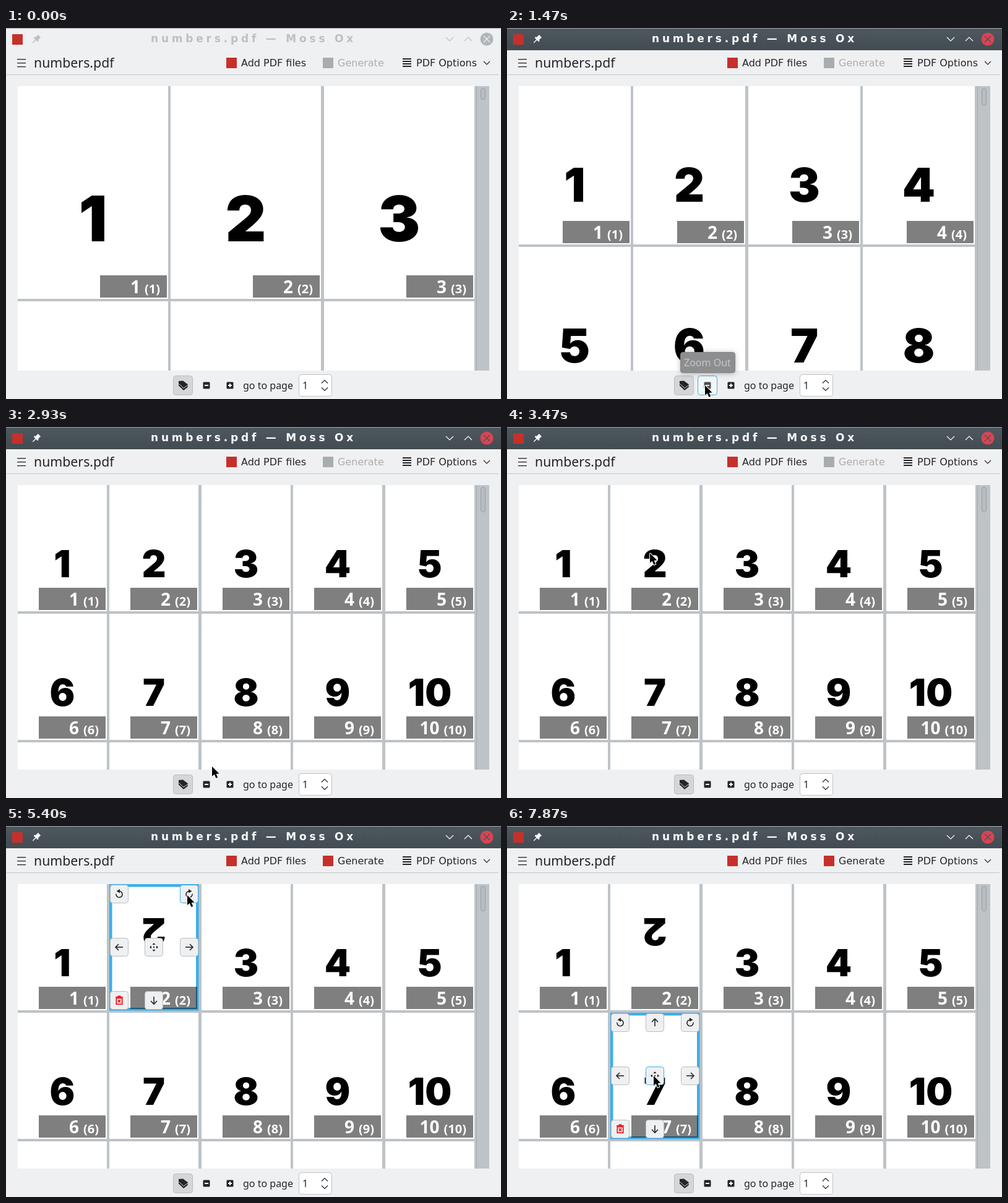
Animation of 800x600 px, one loop 8000 ms. Source, as an HTML page with a canvas:

```html
<!DOCTYPE html>
<html lang="en">
<head>
<meta charset="utf-8">
<title>Page editor</title>
<style>
html, body { margin: 0; width: 100%; height: 100%; overflow: hidden; background: #eff0f1; }
canvas { display: block; width: 800px; height: 600px; }
</style>
</head>
<body>
<canvas id="stage" width="800" height="600"></canvas>
<script>
const LOOP = 8000, STEP = 1000 / 15;
const BG = '#eff0f1', GREY = '#bdc3c7', INK = '#232629', BLUE = '#3daee9', PRESSED = '#a9d5ef', RED = '#c6302b';
const SANS = '"Noto Sans", sans-serif', UI = '"DejaVu Sans", sans-serif', HEAVY = 'Inter, sans-serif';
const c = document.getElementById('stage').getContext('2d');

// pointer track: time, x, y
const TRACK = [
  [133, 320, 602], [333, 320, 590], [533, 320, 590], [733, 320, 578],
  [2867, 320, 578], [3067, 360, 490], [3267, 262, 320], [3400, 211, 222], [3466, 231, 204],
  [3867, 231, 204], [4400, 293, 112], [5933, 293, 112], [6200, 372, 235],
  [6533, 346, 344], [6733, 235, 344], [7533, 235, 344], [7866, 237, 404]
];
let now = 0, mouse = [0, 0];

const clamp = k => Math.max(0, Math.min(1, k));
const between = (a, b) => now >= a - 1 && now < b - 1;
const mix = (a, b, k) => `rgb(${a.map((v, i) => Math.round(v + (b[i] - v) * k))})`;

function pointerAt(t) {
  const i = TRACK.findIndex(p => p[0] > t);
  if (i === 0) return [320, 640];
  if (i < 0) return TRACK.at(-1).slice(1);
  const [t0, x0, y0] = TRACK[i - 1], [t1, x1, y1] = TRACK[i];
  const k = (t - t0) / (t1 - t0);
  return [Math.round(x0 + (x1 - x0) * k), Math.round(y0 + (y1 - y0) * k)];
}

function rect(x, y, w, h, color) {
  c.fillStyle = color;
  c.fillRect(x, y, w, h);
}
function box(x, y, w, h, r, fill, stroke) {
  c.beginPath();
  c.roundRect(x + .5, y + .5, w - 1, h - 1, r);
  c.fillStyle = fill;
  c.fill();
  if (stroke) { c.strokeStyle = stroke; c.lineWidth = 1; c.stroke(); }
}
function text(s, x, y, font, color, align = 'left') {
  c.font = font;
  c.fillStyle = color;
  c.textAlign = align;
  c.fillText(s, x, y);
  return c.measureText(s).width;
}
function line(color, width, ...pts) {
  c.beginPath();
  for (let i = 0; i < pts.length; i += 2) c.lineTo(pts[i], pts[i + 1]);
  c.strokeStyle = color;
  c.lineWidth = width;
  c.stroke();
}
function shape(color, ...pts) {
  c.beginPath();
  for (let i = 0; i < pts.length; i += 2) c.lineTo(pts[i], pts[i + 1]);
  c.fillStyle = color;
  c.fill();
}
// chevron: dir 1 points down, -1 points up
const chevron = (x, y, w, dir, color, width = 1.2) =>
  line(color, width, x - w, y - dir * w / 2, x, y + dir * w / 2, x + w, y - dir * w / 2);

function at(x, y, angle, draw, flip = 1) {
  c.save();
  c.translate(x, y);
  c.rotate(angle);
  c.scale(flip, 1);
  draw();
  c.restore();
}
const isOver = (x, y, w, h) => mouse[0] >= x && mouse[0] < x + w && mouse[1] >= y && mouse[1] < y + h;

// ---- page grid ----
function cellOf(i, cols) {
  const pitch = 742.5 / cols, h = (pitch - 4) * 1.414;
  return {
    x: Math.floor(19 + i % cols * pitch), y: Math.floor(94 + Math.floor(i / cols) * (h + 4)),
    w: Math.floor(pitch - 4), h: Math.floor(h)
  };
}

function page(i, cols, selected) {
  const { x, y, w, h } = cellOf(i, cols);
  if (y > 554) return;
  const turns = i === 1 ? between(4667, 5333) ? 1 : now >= 5332 ? 2 : 0 : 0;
  at(x + w / 2, y + h / 2, turns * Math.PI / 2, () => {
    if (turns === 1) c.scale(w / h, w / h);
    rect(-w / 2, -h / 2, w, h, '#fff');
    text(i + 1, 0, h * .23, `900 ${w * .42}px ${HEAVY}`, '#000', 'center');
  });
  if (selected) {
    c.strokeStyle = BLUE;
    c.lineWidth = 4.5;
    c.strokeRect(x + 2.25, y + 2.25, w - 4, h - 4);
  }
  const right = x + w - 2, base = y + h - 9;
  rect(right - 108, y + h - 38, 108, 36, 'rgba(0,0,0,.5)');
  const small = text(`(${i + 1})`, right - 11, base, `bold 20px ${SANS}`, '#fff', 'right');
  text(i + 1, right - 18 - small, base, `bold 28px ${SANS}`, '#fff', 'right');
  if (selected) pageButtons(x, y, i >= cols);
}

function grid(cols, selected = -1) {
  for (let i = 0; i < cols * 3; i++) page(i, cols, i === selected);
}

const arrow = () => {
  line(INK, 1.6, -6, 0, 6, 0);
  line(INK, 1.6, 1, -5, 6, 0, 1, 5);
};
const turnArrow = () => {
  c.beginPath();
  c.arc(0, .5, 5, -Math.PI * .45, Math.PI * 1.05);
  c.strokeStyle = INK;
  c.lineWidth = 1.6;
  c.stroke();
  shape(INK, -4.5, -4.5, 1, -8, 1, -1.5);
};
const moveIcon = () => {
  rect(-1, -1, 2, 2, INK);
  for (let k = 0; k < 4; k++) at(0, 0, k * Math.PI / 2, () => shape(INK, 4, -2.5, 7, 0, 4, 2.5));
};
const bin = () => {
  const red = '#e60a14';
  rect(-6, -6, 12, 1.6, red);
  rect(-2.5, -7.5, 5, 2, red);
  c.strokeStyle = red;
  c.lineWidth = 1.6;
  c.strokeRect(-4.7, -3.5, 9.4, 9.7);
  line(red, 1.6, -2, -1, 2, 3.5);
  line(red, 1.6, 2, -1, -2, 3.5);
};

function pageButtons(x, y, hasUp) {
  const put = (col, row, draw, angle = 0, flip = 1) => {
    const bx = x + [1, 57, 114][col], by = y + [1, 87, 173][row];
    const over = isOver(bx, by, 30, 30);
    const down = over && (between(4600, 4733) || between(5267, 5400));
    box(bx, by, 30, 30, 4, down ? PRESSED : BG, over ? BLUE : '#b9bdc1');
    at(bx + 15, by + 15, angle, draw, flip);
  };
  put(0, 0, turnArrow);
  put(2, 0, turnArrow, 0, -1);
  if (hasUp) put(1, 0, arrow, -Math.PI / 2);
  put(0, 1, arrow, Math.PI);
  put(1, 1, moveIcon);
  put(2, 1, arrow);
  put(0, 2, bin);
  put(1, 2, arrow, Math.PI / 2);
}

function view() {
  rect(19, 94, 762, 460, GREY);
  c.save();
  c.beginPath();
  c.rect(19, 94, 738, 460);
  c.clip();
  const cols = now < 1332 ? 3 : now < 2199 ? 4 : 5;
  // right after a zoom the gaps still show the previous grid
  if (between(1333, 1400) || between(2200, 2267)) grid(cols - 1);
  grid(cols, now < 3666 ? -1 : now < 6999 ? 1 : 6);
  c.restore();
  rect(760, 94, 1, 460, '#a5abaf');
  box(767, 97, 8, [19, 29, 41][cols - 3], 4, '#b8bdc1', '#979da1');
}

// ---- window ----
function titleBar() {
  const k = clamp((now - 933) / 200);
  const g = c.createLinearGradient(0, 1, 0, 36);
  g.addColorStop(0, mix([239, 240, 241], [78, 88, 95], k));
  g.addColorStop(1, mix([239, 240, 241], [67, 75, 82], k));
  rect(0, 1, 800, 35, g);
  rect(0, 0, 800, 1, '#a3a6a8');
  const fg = mix([189, 192, 195], [252, 252, 252], k);
  rect(10, 10, 17, 17, RED);
  at(49, 18, Math.PI / 4, () => {
    rect(-3, -7, 6, 7, fg);
    rect(-4.5, -1, 9, 2.5, fg);
    rect(-.7, 1, 1.4, 7, fg);
  });
  c.letterSpacing = '4.8px';
  text('numbers.pdf — Moss Ox', 234, 23, `bold 17px ${UI}`, fg);
  c.letterSpacing = '0px';
  chevron(717, 18, 6, 1, fg);
  chevron(747, 18, 6, -1, fg);
  c.beginPath();
  c.arc(777, 18, 10.5, 0, 7);
  c.fillStyle = mix([176, 181, 185], [218, 68, 83], k);
  c.fill();
  const cross = mix([239, 240, 241], [72, 81, 88], k);
  line(cross, 1.3, 772, 13, 782, 23);
  line(cross, 1.3, 782, 13, 772, 23);
}

function toolBar() {
  for (const y of [50, 56, 62]) rect(18, y, 14, 1.3, INK);
  text('numbers.pdf', 45, 64, `21.3px ${SANS}`, INK);
  rect(356, 48, 17, 17, RED);
  text('Add PDF files', 380, 62, `16px ${UI}`, INK);
  const on = now >= 4666;
  rect(512, 48, 17, 17, on ? RED : '#a9acae');
  text('Generate', 536, 62, `16px ${UI}`, on ? INK : '#abadaf');
  for (const y of [49, 53, 57, 61]) rect(641, y, 14, 2, INK);
  text('PDF Options', 663, 62, `16px ${UI}`, INK);
  chevron(777, 56.5, 5, 1, INK);
  rect(1, 75, 795, 1, '#c3c7ca');
}

function zoomIcon(x, plus) {
  box(x - 6, 572, 12, 12, 1.5, INK);
  rect(x - 3, 577, 6, 2, '#fff');
  if (plus) rect(x - 1, 575, 2, 6, '#fff');
}

function bottomBar() {
  box(270, 562, 32, 32, 4, '#d4d6d8', '#b9bdc1');
  shape(INK, 279, 571, 286, 570.5, 294, 576.5, 293.5, 581, 287, 586, 279, 578.5);
  line('#d4d6d8', 1, 279.5, 575.5, 287, 582.5, 294, 577.5);
  if (now >= 999 && isOver(308, 562, 32, 32)) {
    const down = between(1067, 1333) || between(2067, 2200);
    box(308, 562, 32, 32, 4, down ? PRESSED : '#f4f5f6', BLUE);
    c.globalAlpha = .8;
  }
  zoomIcon(324);
  c.globalAlpha = 1;
  zoomIcon(362, true);
  text('go to page', 383, 584, `16px ${SANS}`, INK);
  box(473, 560, 54, 36, 4, '#fff', GREY);
  text('1', 479, 584, `16px ${SANS}`, INK);
  chevron(515, 572, 5, -1, INK);
  chevron(515, 584, 5, 1, INK);
}

function tooltip() {
  const k = clamp(Math.min((now - 1000) / 200, (2200 - now) / 200));
  if (!k) return;
  c.globalAlpha = k;
  c.shadowColor = 'rgba(0,0,0,.3)';
  c.shadowBlur = 9;
  c.shadowOffsetY = 1;
  box(280, 524, 89, 34, 4, '#8d8e8f');
  c.shadowColor = 'transparent';
  box(280, 524, 89, 34, 4, '#8d8e8f', '#838485');
  text('Zoom Out', 286, 547, `16px ${SANS}`, '#c4c6c7');
  c.globalAlpha = 1;
}

function pointer() {
  at(...mouse, 0, () => {
    c.lineJoin = 'round';
    const pts = [0, 0, 0, 16, 3.7, 12.8, 6.5, 19, 9.3, 17.8, 6.6, 12, 11.5, 11.5, 0, 0];
    line('#fff', 2, ...pts);
    shape('#000', ...pts);
    c.lineJoin = 'miter';
  });
}

function frame(time) {
  now = Math.floor((time % LOOP + 4) / STEP) * STEP;
  mouse = pointerAt(now);
  rect(0, 0, 800, 600, BG);
  titleBar();
  toolBar();
  view();
  bottomBar();
  tooltip();
  pointer();
}

const start = performance.now();
(function tick() {
  frame(performance.now() - start);
  requestAnimationFrame(tick);
})();
</script>
</body>
</html>
```
